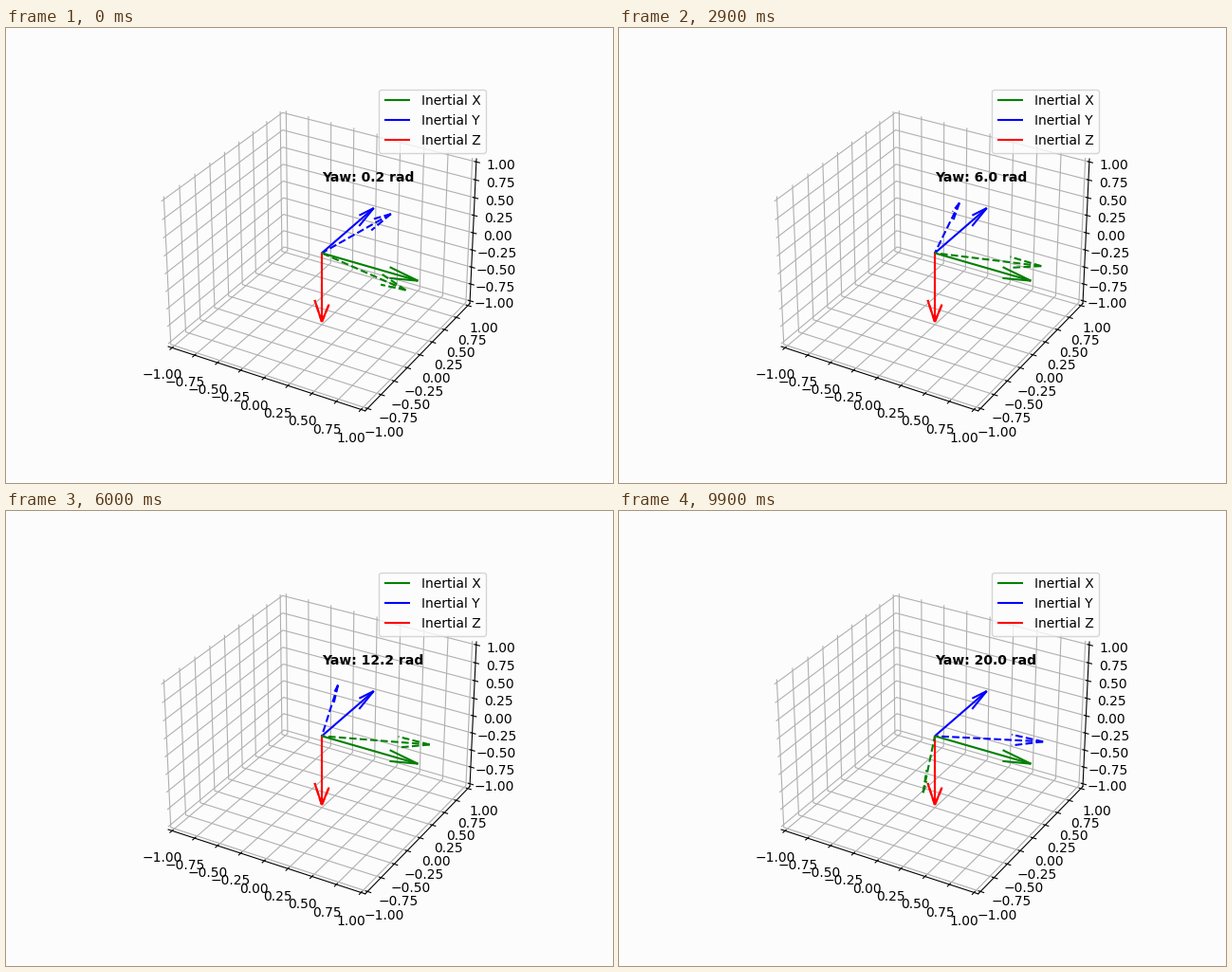
A matplotlib script that plays this animation: 640 px wide and 480 px high, repeating every 10000 ms.

```python
import numpy as np
import matplotlib.pyplot as plt
from matplotlib.animation import FuncAnimation

FRAMES = 100
INTERVAL = 100
YAW_STEP = 0.2
COLORS = ("green", "blue", "red")
PAPER = "#fcfcfc"

plt.rcParams["axes3d.automargin"] = True

fig = plt.figure(figsize=(6.4, 4.8), dpi=100, facecolor=PAPER)
ax = fig.add_subplot(projection="3d", facecolor=PAPER)
ax.set(xlim=(-1, 1), ylim=(-1, 1), zlim=(-1, 1))
for axis in (ax.xaxis, ax.yaxis, ax.zaxis):
    axis.set_pane_color((1, 1, 1, 0))


def arrow(direction, color, **style):
    return ax.quiver(0, 0, 0, *direction, color=color, **style)


def body_axes(yaw):
    c, s = np.cos(yaw), np.sin(yaw)
    return (c, -s, 0), (s, c, 0), (0, 0, -1)


for direction, color, name in zip(body_axes(0), COLORS, "XYZ"):
    arrow(direction, color, label=f"Inertial {name}")
ax.legend(loc="upper right", facecolor=PAPER)

label = ax.text(0, 0, 1, "", color="black", weight="bold")
body = []


def update(i):
    yaw = YAW_STEP * (i + 1)
    while body:
        body.pop().remove()
    for direction, color in zip(body_axes(yaw), COLORS):
        body.append(arrow(direction, color, linestyle="dashed"))
    label.set_text(f"Yaw: {yaw:.1f} rad")
    return [*body, label]


anim = FuncAnimation(fig, update, frames=FRAMES, interval=INTERVAL,
                     repeat=True, repeat_delay=0, blit=False)
plt.show()
```
